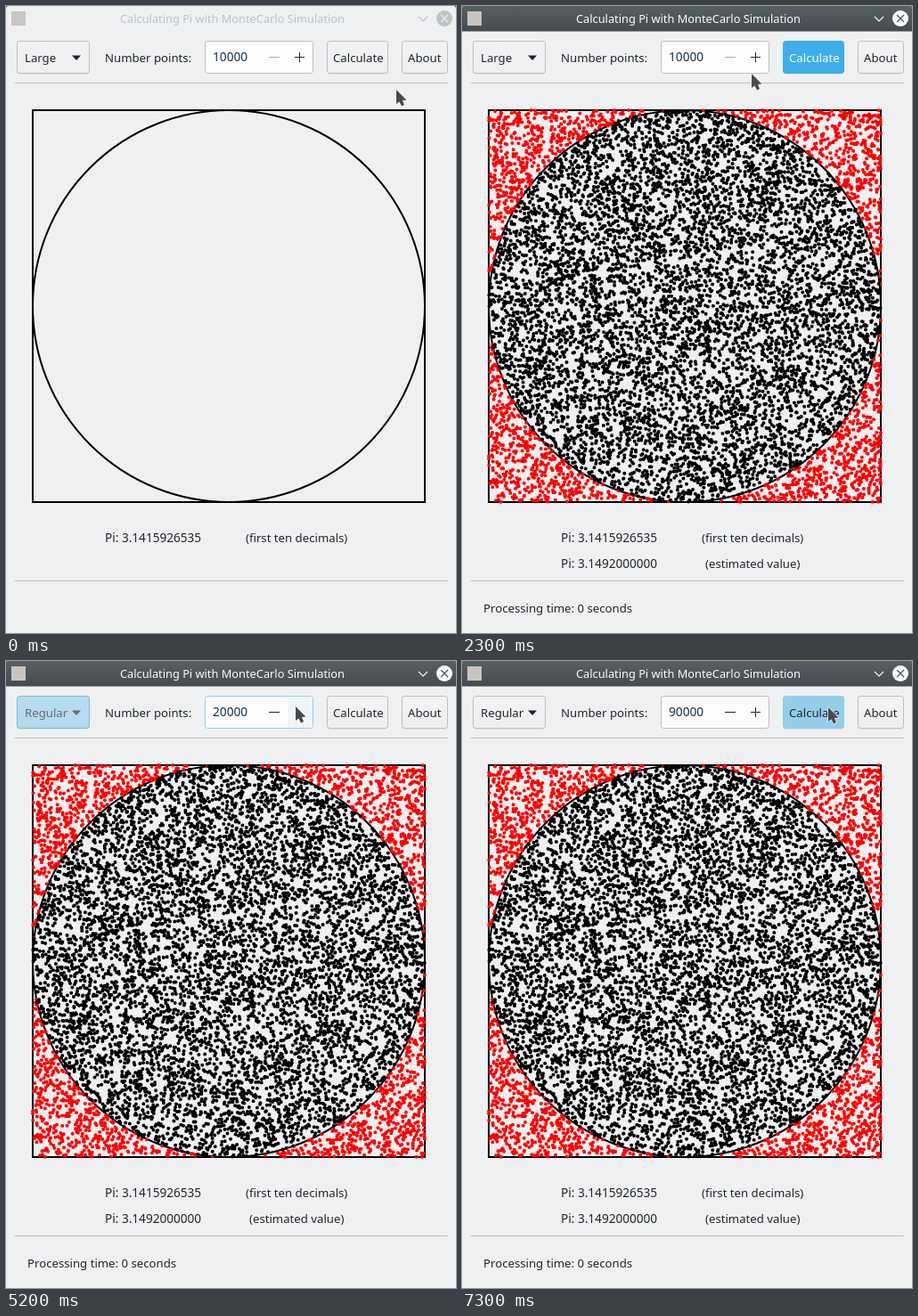
An HTML page with a canvas for the animation above (8 s loop, 505x704 px).

```html
<!DOCTYPE html>
<html>
<head>
<meta charset="utf-8">
<style>
html, body { margin: 0; width: 100%; height: 100%; overflow: hidden; background: #eff0f1; }
canvas { display: block; }
</style>
</head>
<body>
<canvas id="stage" width="505" height="704"></canvas>
<script>
const LOOP = 8000, STEP = 100;
const INK = '#232629', BG = '#eff0f1', WHITE = '#fcfcfc';
const BLUE = '#3daee9', LIGHT = '#93cee9', LINE = '#bcbebf';
const g = document.getElementById('stage').getContext('2d');
let t = 0;

const clamp = (v, lo, hi) => Math.min(hi, Math.max(lo, v));
const ramp = (a, b) => clamp((t - a) / (b - a), 0, 1);
const between = (a, b) => t >= a && t < b;
const ease = k => k * k * (3 - 2 * k);

// Pointer moves: start, end, x, y
const moves = [
  [100, 700, 398, 50], [1800, 2300, 325, 76], [2300, 2400, 177, 50],
  [2500, 3100, 80, 57], [3400, 3800, 58, 88], [4200, 4400, 341, 71],
  [4400, 5000, 325, 51], [6200, 6700, 411, 52]
];

function pointer() {
  return moves.reduce(([x, y], [start, end, toX, toY]) => {
    const k = ease(ramp(start, end));
    return [x + (toX - x) * k, y + (toY - y) * k];
  }, [438, 94]);
}

function text(str, x, y, color = INK, size = 13.2) {
  g.font = size + 'px "Noto Sans", sans-serif';
  g.fillStyle = color;
  g.fillText(str, x, y);
}

function box(x, y, w, h, r, fill, stroke) {
  g.beginPath();
  g.roundRect(x, y, w, h, r);
  if (fill) { g.fillStyle = fill; g.fill(); }
  if (stroke) { g.strokeStyle = stroke; g.lineWidth = 1; g.stroke(); }
}

function poly(points, close) {
  g.beginPath();
  points.forEach(p => g.lineTo(...p));
  if (close) g.closePath();
}

function faded(alpha, draw) {
  if (alpha <= 0) return;
  g.save();
  g.globalAlpha = alpha;
  draw();
  g.restore();
}

function shade(height, top, bottom, y = 0) {
  const fill = g.createLinearGradient(0, y, 0, y + height);
  fill.addColorStop(0, top);
  fill.addColorStop(1, bottom);
  return fill;
}

function scatter() {
  const layer = document.createElement('canvas');
  layer.width = 505;
  layer.height = 704;
  const c = layer.getContext('2d');
  let seed = 31492;
  const random = () => (seed = seed * 16807 % 2147483647) / 2147483647;
  const inside = new Path2D(), outside = new Path2D();
  for (let i = 0; i < 10000; i++) {
    const x = 30 + random() * 440, y = 117 + random() * 440;
    const dots = Math.hypot(x - 250, y - 337) <= 220 ? inside : outside;
    dots.moveTo(x + 2, y);
    dots.arc(x, y, 2, 0, 7);
  }
  c.fillStyle = '#f00';
  c.fill(outside);
  c.fillStyle = '#000';
  c.fill(inside);
  return layer;
}
const dots = scatter();

function titleBar(active) {
  const fg = active ? WHITE : '#bdc3c7';
  box(0, 0, 505, 28.5, [3, 3, 0, 0], active ? shade(28, '#566067', '#434c52') : BG);
  text('Calculating Pi with MonteCarlo Simulation', 128, 19, fg, 12.8);
  g.lineWidth = 1.1;
  g.strokeStyle = fg;
  poly([[463, 12], [468, 17], [473, 12]]);
  g.stroke();
  box(483, 5, 18, 18, 9, fg);
  g.strokeStyle = active ? '#475057' : BG;
  poly([[488, 10], [496, 18]]);
  g.stroke();
  poly([[496, 10], [488, 18]]);
  g.stroke();
}

function button(x, w, label, { focus = 0, press = 0, hover = false, arrow = false } = {}) {
  const face = (fill, stroke) => box(x + .5, 39.5, w - 1, 36, 3, fill, stroke);
  box(x + .5, 40.5, w - 1, 36, 3, 'rgba(0,0,0,.1)');
  face(shade(37, '#f2f3f4', '#edeeef', 39), hover ? LIGHT : LINE);
  faded(focus, () => face(BLUE, BLUE));
  faded(press, () => face(LIGHT, LIGHT));
  const k = focus * (1 - press);
  const color = `rgb(${[35, 38, 41].map(v => Math.round(v + (252 - v) * k))})`;
  text(label, x + (arrow ? 9 : 7), 63, color);
  if (arrow) {
    poly([[x + 62, 55.5], [x + 72, 55.5], [x + 67, 61]], true);
    g.fill();
  }
}

function spin(value, focus, held) {
  box(223.5, 39.5, 121, 36, 3, WHITE, focus ? LIGHT : LINE);
  if (held) box(316, 40, 28, 35, [0, 2, 2, 0], '#eff5f8');
  text(value, 232, 62, '#17324d', 13.7);
  g.fillStyle = value > 10000 ? INK : '#a9abad';
  g.fillRect(295, 57, 12, 1);
  g.fillStyle = held ? WHITE : INK;
  g.fillRect(324, 57, 11, 1);
  g.fillRect(329, 52, 1, 11);
}

function popup(selected) {
  ['Large', 'Regular', 'Small'].forEach((label, i) => {
    const y = 40 + i * 31, on = i === selected;
    box(10, y, 86, 31, 0, on ? BLUE : BG);
    text(label, 16, y + 22, on ? WHITE : INK);
  });
  box(10.5, 39.5, 85, 93, 2, null, '#d0d2d3');
}

function arrowCursor(x, y) {
  g.save();
  g.translate(x, y);
  poly([[0, 0], [0, 16], [3.5, 13.5], [6, 18.5], [9, 17], [7, 12], [11.5, 11.5]], true);
  g.lineJoin = 'round';
  g.lineWidth = 1.6;
  g.strokeStyle = 'rgba(252,252,252,.8)';
  g.stroke();
  g.fillStyle = '#4a4a4c';
  g.fill();
  g.restore();
}

function draw() {
  const [x, y] = pointer();
  const over = (a, b) => x >= a && x < b && y >= 39 && y < 76;
  const clicks = clamp(Math.floor((t - 5100) / 150) + 1, 0, 8);

  g.fillStyle = '#2b4a5c';
  g.fillRect(0, 0, 505, 10);
  g.fillStyle = BG;
  g.fillRect(0, 10, 505, 694);

  const active = ramp(1100, 1400);
  titleBar(false);
  faded(active, () => titleBar(true));
  box(6, 6, 16, 16, 0, '#c8c4c0');

  g.fillStyle = LINE;
  g.fillRect(10, 86, 486, 1);
  g.fillRect(10, 645, 486, 1);

  button(12, 82, t < 4200 ? 'Large' : 'Regular', {
    focus: ramp(3300, 3400) - ramp(5000, 5300), hover: over(12, 94), arrow: true
  });
  text('Number points:', 111, 63);
  spin(10000 * (1 + clicks), between(5100, 7300), over(316, 345));
  button(360, 69, 'Calculate', {
    focus: ramp(1700, 1900) * (1 - ramp(3260, 3460)),
    press: t < 7300 ? active - ramp(1700, 1900) : 1,
    hover: over(360, 429)
  });
  button(444, 52, 'About');

  g.strokeStyle = '#000';
  g.lineWidth = 2;
  g.strokeRect(30, 117, 440, 440);
  g.beginPath();
  g.arc(250, 337, 220, 0, 7);
  g.stroke();

  text('Pi: 3.1415926535', 111, 602, INK, 13.6);
  text('(first ten decimals)', 269, 602);
  if (t >= 1800) {
    g.drawImage(dots, 0, 0);
    text('Pi: 3.1492000000', 111, 631, INK, 13.6);
    text('(estimated value)', 273, 631);
    text('Processing time: 0 seconds', 24, 681);
  }

  faded(ramp(3320, 3520) - ramp(4200, 4420), () => popup(t < 3600 ? 0 : 1));
  arrowCursor(x, y);
}

function frame(now) {
  t = Math.floor(now % LOOP / STEP) * STEP;
  draw();
  requestAnimationFrame(frame);
}
requestAnimationFrame(frame);
</script>
</body>
</html>
```
